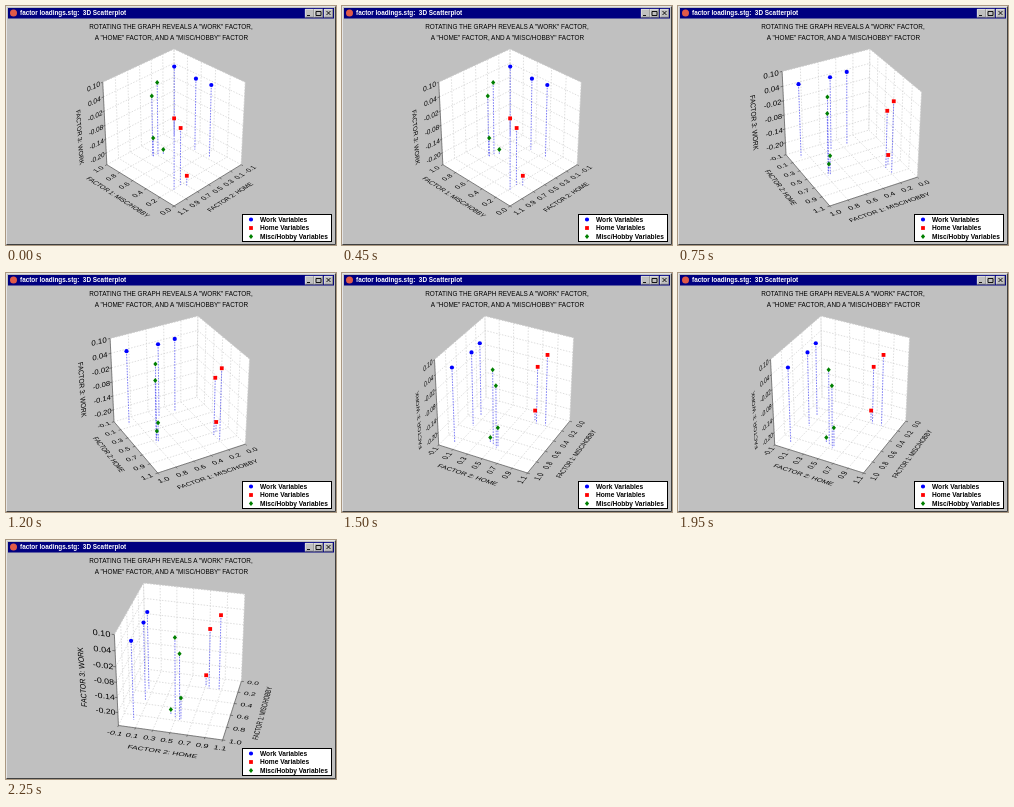
Animation of 330x239 px, one loop 3 s. Source, as an HTML page:

```html
<!DOCTYPE html>
<html lang="en">
<head>
<meta charset="utf-8">
<title>3D Scatterplot</title>
<style>
  html, body { margin: 0; width: 100%; height: 100%; overflow: hidden; background: #c0c0c0; }
  svg { display: block; width: 330px; height: 239px; font-family: Arial, "Liberation Sans", sans-serif; }
  .view { visibility: hidden; animation: show 3s step-end infinite; }
  @keyframes show { 0% { visibility: visible; } 25%, 100% { visibility: hidden; } }
  .bar { font-size: 6.4px; font-weight: bold; fill: #fff; white-space: pre; }
  .head { font-size: 6.42px; text-anchor: middle; }
  .key { font-size: 6.6px; font-weight: bold; }
  .label { font-size: 10px; text-anchor: middle; }
  .grid { stroke: #c8c8c8; stroke-width: .6; stroke-dasharray: 1.5 1.5; }
  .axis { stroke: #404040; stroke-width: .6; }
  .drop { stroke: #3838f0; stroke-width: .65; stroke-dasharray: 1.6 1.2; }
</style>
</head>
<body>
<svg viewBox="0 0 330 239">
  <rect width="330" height="239" fill="#c0c0c0"/>
  <path d="M.5 238.5V.5H329.5" fill="none" stroke="#e4e4e4"/>
  <path d="M.5 238.5H329.5V.5" fill="none" stroke="#404040"/>
  <rect x="2" y="2" width="326" height="10.5" fill="#000080"/>
  <circle cx="7.5" cy="7" r="3.5" fill="#e05a48"/>
  <text class="bar" x="14" y="9.4">factor loadings.stg:  3D Scatterplot</text>
  <g id="buttons"></g>
  <text class="head" x="165" y="23">ROTATING THE GRAPH REVEALS A "WORK" FACTOR,</text>
  <text class="head" x="165.5" y="34">A "HOME" FACTOR, AND A "MISC/HOBBY" FACTOR</text>
  <g id="views"></g>
  <g id="legend"><rect x="236.5" y="208.5" width="89" height="27" fill="#fff" stroke="#000"/></g>
</svg>
<script>
const NS = 'http://www.w3.org/2000/svg';
const TILT = 32.5 * Math.PI / 180, DISTANCE = 9, TOP = 43, HEIGHT = 157;
const VIEWS = [{ turn: -45, x: 168 }, { turn: 28.5, x: 172.5 }, { turn: 62.5, x: 163.5 }, { turn: 77, x: 176 }];

// Each point: factor 1, factor 2, height above the floor (box height = 1).
const GROUPS = [
  { name: 'Work Variables', color: '#0000ff', shape: 'm-2.1 0a2.1 2.1 0 1 0 4.2 0a2.1 2.1 0 1 0-4.2 0',
    points: [[.88, .04, .88], [.54, .07, .88], [.34, .05, .88]] },
  { name: 'Home Variables', color: '#ff0000', shape: 'm-1.9-1.9h3.8v3.8h-3.8z',
    points: [[.19, .87, .85], [.2, .75, .69], [.15, .7, .12]] },
  { name: 'Misc/Hobby Variables', color: '#008000', shape: 'm0-2.5l2.1 2.5l-2.1 2.5l-2.1-2.5z',
    points: [[.75, .49, .89], [.78, .55, .74], [.76, .56, .24], [.72, .43, .06]] }
];

// Box coordinates run from 0 to 1 along factor 1, factor 2 and height.
const AXES = [
  { title: 'FACTOR 1: MISC/HOBBY', steps: 5, value: t => t.toFixed(1) },
  { title: 'FACTOR 2: HOME', steps: 6, value: t => (1.2 * t - .1).toFixed(1) },
  { title: 'FACTOR 3: WORK', steps: 5, value: t => (.1 - .3 * (1 - t) / .85).toFixed(2) }
];
const UP = [0, 0, 1], DOWN = [0, 0, -1], LOWEST_TICK = [0, 0, .15];

const plus = (a, b, k = 1) => a.map((v, i) => v + b[i] * k);
const minus = (a, b) => plus(a, b, -1);
const mix = (a, b, t) => plus(a, minus(b, a), t);

function add(parent, tag, attrs, text) {
  const el = document.createElementNS(NS, tag);
  for (const k in attrs) el.setAttribute(k, attrs[k]);
  if (text) el.textContent = text;
  return parent.appendChild(el);
}
const line = (g, cls, ...points) => add(g, 'path', { class: cls, fill: 'none', d: `M${points.join('L')}` });
const marker = (g, { shape, color }, [x, y]) => add(g, 'path', { d: `M${x} ${y}${shape}`, fill: color });

// Perspective camera, scaled so that the box always fills the same height.
function camera({ turn, x: centre }) {
  const a = turn * Math.PI / 180;
  const raw = ([p, q, z]) => {
    const x = .5 - p, y = .5 - q, h = z - .5;
    const side = x * Math.cos(a) - y * Math.sin(a), back = x * Math.sin(a) + y * Math.cos(a);
    const k = DISTANCE / (DISTANCE + back * Math.cos(TILT) - h * Math.sin(TILT));
    return [side * k, -(h * Math.cos(TILT) + back * Math.sin(TILT)) * k];
  };
  const floor = [[0, 0, 0], [0, 1, 0], [1, 0, 0], [1, 1, 0]];
  const [back, m, n, front] = floor.sort((c, d) => raw(c)[1] - raw(d)[1]);
  const [left, right] = [m, n].sort((c, d) => raw(c)[0] - raw(d)[0]);
  const min = raw(plus(back, UP))[1], scale = HEIGHT / (raw(front)[1] - min);
  const place = p => {
    const [x, y] = raw(p);
    return [centre + x * scale, TOP + (y - min) * scale];
  };
  return { place, back, left, front, right };
}

// Text lying in the plane spanned by two box directions.
function write(g, place, text, pos, run, down, size) {
  const o = place(pos), k = size / 10;
  const [a, b] = minus(place(plus(pos, run, .1)), o).map(v => v * 10 * k);
  const [c, d] = minus(place(plus(pos, down, .1)), o).map(v => v * 10 * k);
  add(g, 'text', { class: 'label', y: 3.6, transform: `matrix(${[a, b, c, d, ...o]})` }, text);
}

function drawView(view, n) {
  const g = add(views, 'g', { class: 'view', style: `animation-delay:${n * .75 - 3}s` });
  const { place, back, left, front, right } = camera(view);
  const draw = (cls, ...points) => line(g, cls, ...points.map(place));
  const lift = p => plus(p, UP);
  const toRight = minus(right, front), toFront = minus(front, left);

  const outline = [lift(left), lift(back), lift(right), right, front, left];
  add(g, 'path', { d: `M${outline.map(place).join('L')}Z`, fill: '#fff' });

  // Labels follow the right edge unless it is seen too steeply.
  const steep = view.turn > 70;
  const run = steep ? toFront : toRight;
  const down = steep ? minus(front, right) : toFront;
  const spin = view.turn > 45 ? 1 : -1;

  const edges = [
    { id: 0, a: front, b: right, out: toFront, run, down },
    { id: 0, a: left, b: front, out: minus(front, right), run, down },
    { id: 2, a: plus(left, LOWEST_TICK), b: lift(left), out: plus([0, 0, 0], run, -1), run, down: DOWN }
  ];
  for (const e of edges) {
    const id = minus(e.b, e.a).findIndex(v => v), axis = AXES[id];
    for (let i = 0; i <= axis.steps; i++) {
      const p = mix(e.a, e.b, i / axis.steps);
      if (id === 2) draw('grid', p, plus(p, minus(back, left)), plus(p, minus(right, left)));
      else draw('grid', p, minus(p, e.out), lift(minus(p, e.out)));
      draw('axis', p, plus(p, e.out, .025));
      write(g, place, axis.value(p[id]), plus(p, e.out, .12), e.run, e.down, .085);
    }
    const wall = id === 2;
    const mid = wall ? plus(left, UP, .5) : mix(e.a, e.b, .5);
    write(g, place, axis.title, plus(mid, e.out, wall ? .33 : .29),
      wall ? [0, 0, spin] : minus(e.b, e.a), wall ? plus([0, 0, 0], run, spin) : e.out, .077);
  }
  draw('axis', lift(left), left, front, right);
  draw('grid', lift(left), lift(back), lift(right), right);

  const spots = GROUPS.flatMap(group => group.points.map(([f1, f2, z]) => ({ group, p: [f1, (f2 + .1) / 1.2, z] })));
  for (const { p } of spots) draw('drop', p, [p[0], p[1], 0]);
  for (const { group, p } of spots) marker(g, group, place(p));
}
VIEWS.forEach(drawView);

GROUPS.forEach((group, i) => {
  const y = 213.5 + i * 8.5;
  marker(legend, group, [245, y]);
  add(legend, 'text', { class: 'key', x: 254, y: y + 2.4 }, group.name);
});

['M2 6.5h3', 'M2 2.5h5v4h-5z', 'M2.5 2l4 4m0-4l-4 4'].forEach((d, i) => {
  const b = add(buttons, 'g', { transform: `translate(${299 + i * 9 + (i > 1)} 3)` });
  add(b, 'rect', { width: 9, height: 8.5, fill: '#c0c0c0' });
  add(b, 'path', { d: 'M.25 8.5V.25H9', fill: 'none', stroke: '#fff', 'stroke-width': .5 });
  add(b, 'path', { d: 'M0 8.25H8.75V0', fill: 'none', stroke: '#404040', 'stroke-width': .5 });
  add(b, 'path', { d, fill: 'none', stroke: '#000', 'stroke-width': .9 });
});
</script>
</body>
</html>
```
